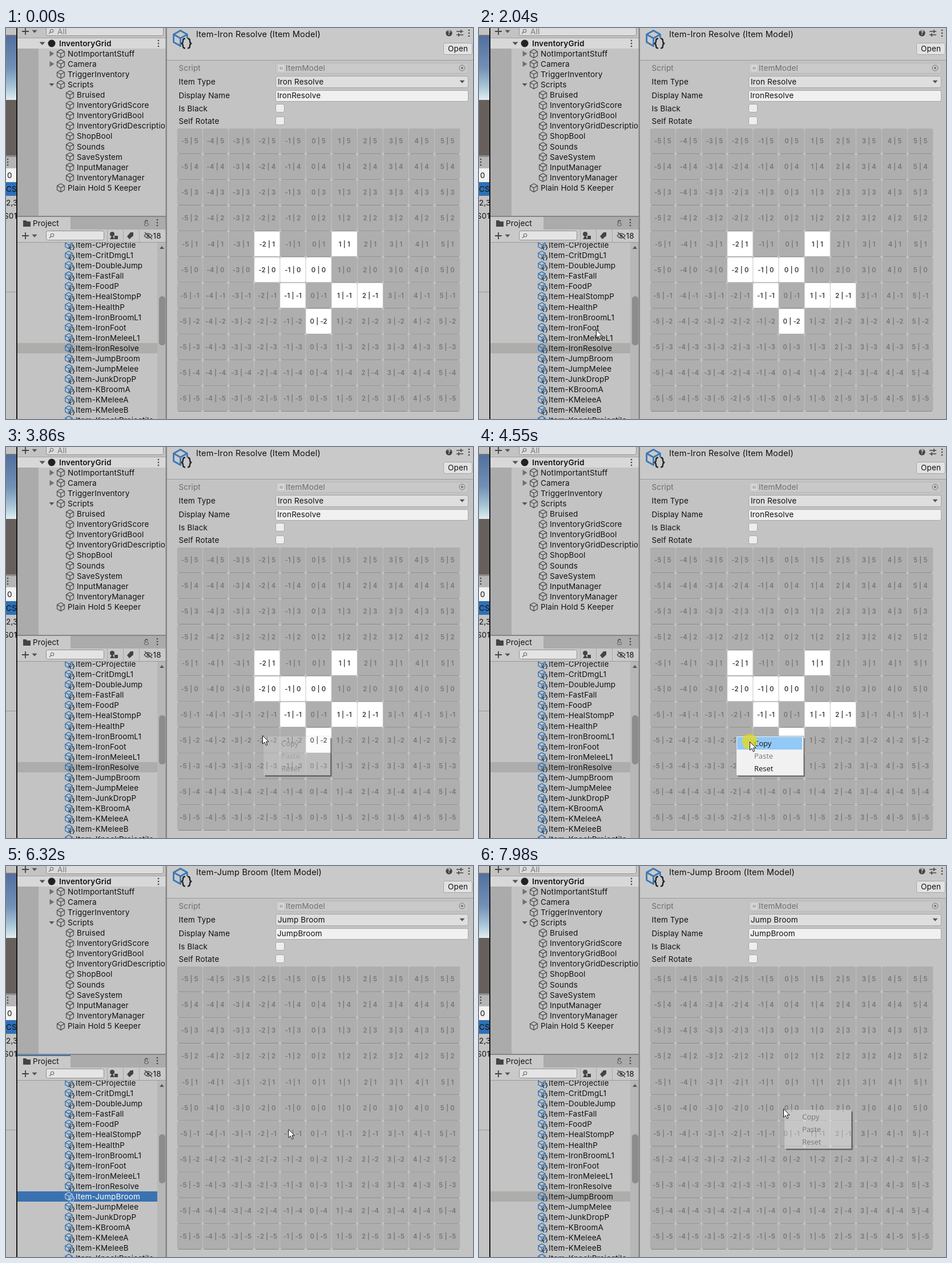
Animation, 818 px wide and 685 px high, one loop 8000 ms. Source, as an HTML page:

```html
<!DOCTYPE html>
<html lang="en">
<head>
<meta charset="utf-8">
<title>Inventory item editor</title>
<style>
html, body { margin: 0; width: 100%; height: 100%; overflow: hidden; background: #c3c3c3; }
svg { display: block; width: 100vw; height: 100vh; }
text { font: 13.5px Inter, sans-serif; letter-spacing: .15px; fill: #111; white-space: pre; }
.cell text { font-size: 11.25px; font-weight: 600; letter-spacing: .2px; text-anchor: middle; fill: #757575; }
.cell rect { fill: #aeaeae; }
.cell.on text { fill: #3c3c3c; }
.cell.on rect { fill: #fff; }
#menu text { font: 13px "Open Sans", sans-serif; letter-spacing: 0; }
.row .back { fill: none; }
.row.held .back { fill: #adadab; }
.row.focus .back { fill: #3a72b0; }
.row.focus text { fill: #fff; }
.row.focus path { stroke: #c6d8ea; stroke-width: 1.1; }
</style>
</head>
<body>
<svg id="stage" viewBox="0 0 818 685" preserveAspectRatio="none"></svg>
<script>
const rect = (x, y, w, h, fill, more = '') =>
  `<rect x="${x}" y="${y}" width="${w}" height="${h}" fill="${fill}" ${more}/>`;
const text = (x, mid, s, more = '') => `<text x="${x}" y="${Math.round(mid + 4.8)}" ${more}>${s}</text>`;
const line = (d, stroke = '#444', width = 1.3, more = '') =>
  `<path d="${d}" fill="none" stroke="${stroke}" stroke-width="${width}" ${more}/>`;
const shape = (d, fill = '#555') => `<path d="${d}" fill="${fill}"/>`;
const circle = (x, y, r, fill, more = '') => `<circle cx="${x}" cy="${y}" r="${r}" fill="${fill}" ${more}/>`;
const field = (x, y, w, h, fill, edge = '#a6a6a6') =>
  rect(x + .5, y + .5, w - 1, h - 1, fill, `rx="3" stroke="${edge}"`);

const right = (x, y) => shape(`M${x - 3.5} ${y - 5}l8 5l-8 5z`, '#707070');
const down = (x, y, r = 4.5) => shape(`M${x - r} ${y - r / 2}h${2 * r}l${-r} ${r * 1.1}z`, '#555');
const dots = (x, y) => [-5, 0, 5].map(d => circle(x, y + d, 1.3, '#444')).join('');
const plus = (x, y) => line(`M${x - 6} ${y}h12M${x} ${y - 6}v12`, '#444', 1.8);
const lens = (x, y) => circle(x + 1, y - 1, 2.7, 'none', 'stroke="#707070" stroke-width="1.1"') +
  line(`M${x - 1} ${y + 1}l-3 3`, '#707070');

function cube(x, y, r, color, width) {
  const a = r * .88, b = r / 2;
  return line(`M${x} ${y - r}l${a} ${b}v${r}l${-a} ${b}l${-a} ${-b}v${-r}z` +
    `m${-a} ${b}l${a} ${b}l${a} ${-b}m${-a} ${b}v${r}`, color, width, 'stroke-linejoin="round"');
}

function braces(x, y, s, width) {
  const half = k => `M${x + k * s * .25} ${y - s}q${k * s * .45} 0 ${k * s * .45} ${s * .4}` +
    `q0 ${s * .6} ${k * s * .4} ${s * .6}q${-k * s * .4} 0 ${-k * s * .4} ${s * .6}q0 ${s * .4} ${-k * s * .45} ${s * .4}`;
  return line(half(1) + half(-1), '#222', width);
}

function gameStrip() {
  return `<defs><linearGradient id="sky" x2="0" y2="1"><stop stop-color="#52709f"/>
    <stop offset=".5" stop-color="#7390b6"/><stop offset=".8" stop-color="#a9c6d8"/>
    <stop offset="1" stop-color="#e0eef0"/></linearGradient></defs>` +
    rect(0, 0, 18, 685, '#c3c3c3') + rect(0, 12, 18, 2, '#777') + rect(0, 14, 18, 112, 'url(#sky)') +
    rect(0, 126, 18, 97, '#665f5b') + rect(0, 223, 18, 3, '#8c8c8c') + rect(0, 226, 18, 19, '#b5b5b5') +
    dots(3, 235) + rect(0, 246, 18, 24, '#f2f2f2') + rect(0, 270, 18, 24, '#2f70b5') +
    text(2, 258, '0') + text(0, 282, 'CS') + text(0, 306, '2,3') + text(-4, 329, 'S01') +
    rect(0, 462, 18, 1, '#999') + rect(18, 0, 2, 685, '#161616');
}

function hierarchy() {
  const rows = [[1, 'NotImportantStuff', right], [1, 'Camera', right], [1, 'TriggerInventory'], [1, 'Scripts', down],
    ...['Bruised', 'InventoryGridScore', 'InventoryGridBool', 'InventoryGridDescriptio', 'ShopBool', 'Sounds',
      'SaveSystem', 'InputManager', 'InventoryManager'].map(s => [2, s]), [1, 'Plain Hold 5 Keeper']];
  return rect(20, 0, 260, 329, '#c3c3c3') + rect(20, 18, 37, 311, '#ababab') + rect(20, 18, 260, 18, '#d8d8d8') +
    rect(20, 17, 260, 1, '#a0a0a0') + plus(34, 6) + down(50, 6) + field(70, -8, 206, 22, '#dcdcdc', '#8e8e8e') +
    lens(79, 6) + text(90, 6, 'All', 'style="fill:#777"') +
    down(63.5, 27, 5) + circle(80, 27, 6.5, '#222') + text(93, 27, 'InventoryGrid', 'style="font-weight:600"') + dots(267, 27) +
    rows.map(([level, name, arrow], i) => {
      const y = 45 + i * 18.08, x = 80 + level * 16;
      return (arrow ? arrow(80, y) : '') + cube(x, y, 7.3, '#555', 1.4) + text(x + 12, y, name);
    }).join('');
}

const items = ['CProjectile', 'CritDmgL1', 'DoubleJump', 'FastFall', 'FoodP', 'HealStompP', 'HealthP', 'IronBroomL1',
  'IronFoot', 'IronMeleeL1', 'IronResolve', 'JumpBroom', 'JumpMelee', 'JunkDropP', 'KBroomA', 'KMeleeA', 'KMeleeB',
  'KnockProjectile'];

function project() {
  const list = items.map((name, i) => {
    const y = 380.3 + i * 18.07;
    return `<g class="row" id="row${i}"><rect class="back" x="20" y="${Math.round(y - 9)}" width="245" height="18"/>` +
      cube(110, y - .5, 7, '#3a78b5', 1.5) + braces(115.5, y + 4, 4.2, 1.2) + text(122, y, 'Item-' + name) + '</g>';
  }).join('');
  return rect(20, 376, 260, 309, '#c3c3c3') + list +
    rect(20, 329, 260, 2, '#858585') + rect(20, 331, 260, 22, '#ababab') + rect(20, 331, 93, 22, '#c9c9c9') +
    rect(20, 331, 93, 2, '#3a72b0', 'id="tab"') + shape('M30 337h5l2 2h6v9h-13z', '#444') + text(47, 342, 'Project') +
    field(242, 341, 8, 6, 'none', '#555') + line('M243.5 341v-2q2.5-4 5 0') + dots(265, 341) +
    rect(20, 353, 260, 22, '#c9c9c9') + rect(20, 375, 260, 1, '#999') + plus(34, 364) + down(50, 364) +
    field(70, 355, 102, 17, '#e4e4e4', '#8e8e8e') + lens(80, 364) +
    [177, 205, 233].map(x => rect(x, 353, 1, 22, '#aaa')).join('') +
    circle(186, 361, 4, '#444') + shape('M182 370l4-7l4 7z', '#444') + rect(190, 364, 6, 6, '#444') +
    shape('M212 365l6-7h5v6l-7 6z', '#444') +
    line('M242 364q7-8 14 0q-7 8-14 0M243 358l13 12', '#444', 1.4) + circle(249, 364, 2.3, '#444') + text(257.5, 364, '18') +
    rect(265, 376, 15, 309, '#b7b7b7') + shape('M269 387l4-5l4 5z') + rect(268, 470, 11, 86, '#8c8c8c', 'rx="5"');
}

const filled = new Set(['-2 | 1', '1 | 1', '-2 | 0', '-1 | 0', '0 | 0', '-1 | -1', '1 | -1', '2 | -1', '0 | -2']);

function grid() {
  let out = '';
  for (let row = 0; row < 11; row++) for (let col = 0; col < 11; col++) {
    const x = 299.8 + col * 45.13, y = 176 + row * 45.13, label = `${col - 5} | ${5 - row}`;
    out += `<g class="cell" data-label="${label}">` +
      `<path d="M${x + 2} ${y + 44}h40" stroke="#858585" stroke-width="1.4"/>` +
      `<rect x="${x}" y="${y}" width="44.2" height="43.8" rx="3"/>` +
      `<text x="${x + 22.2}" y="${Math.round(y + 26)}">${label}</text></g>`;
  }
  return out;
}

function inspector() {
  const grey = 'style="fill:#6e6e6e"';
  return rect(279.5, 0, 2.5, 685, '#858585') + rect(282, 0, 536, 685, '#c3c3c3') + rect(282, 0, 536, 56, '#c9c9c9') +
    rect(282, 56, 536, 1, '#999') + cube(305.5, 18, 13.5, '#3a78b5', 2.8) +
    rect(307, 18, 18, 18, '#c9c9c9', 'rx="5"') + braces(316, 27, 8.5, 2.4) +
    text(333, 11.5, '', 'id="title" style="font-size:14.6px"') +
    circle(776, 9, 5.6, '#444') + text(776, 8.6, '?', 'style="fill:#ddd;font-size:10px;font-weight:700;text-anchor:middle" dy="-1"') +
    line('M789 6h12M789 12h12M797 3v6M793 9v6', '#444', 1.6) + dots(811, 9) +
    field(766, 26, 51, 21, '#e2e2e2') + text(774, 36, 'Open') +
    ['Script', 'Item Type', 'Display Name', 'Is Black', 'Self Rotate']
      .map((s, i) => text(302.5, [70, 94, 118, 141, 163][i], s, i ? '' : grey)).join('') +
    field(472, 61, 338, 19, '#c9c9c9', '#b8b8b8') + rect(477, 65, 10, 11, '#dadada', 'rx="1"') +
    line('M480.5 67.5v6M483.5 67.5v6M479 69.3h6M479 71.7h6', '#999', .8) + text(490, 70, 'ItemModel', grey) +
    circle(799, 70, 5, 'none', 'stroke="#777"') + circle(799, 70, 2, '#777') +
    field(472, 84, 338, 21, '#dedede') + text(476, 94, '', 'id="type"') + down(799, 94) +
    field(472, 109, 338, 20, '#f0f0f0') + text(475, 118.5, '', 'id="name"') +
    field(472, 133, 16, 15, '#eee') + field(472, 155, 16, 15, '#eee') + grid();
}

const overlay = `<g id="menu">${line('M5 71.3H120.3V5', '#000', 2.6, 'opacity=".45"')}<g id="sheet">` +
  rect(1.5, 1.5, 118, 69, '#f1f1f1', 'stroke="#a5a5a5"') + rect(3, 3, 114, 22, '#91c9f7', 'id="hover"') +
  text(33, 14.5, 'Copy') + text(33, 36, 'Paste', 'id="paste"') + text(33, 57.7, 'Reset') + '</g></g>' +
  '<g id="cursor">' + circle(0, 0, 13.3, '#f2dc00', 'id="press" opacity=".68"') +
  '<path d="M.5 .5V15.2L4 12L6.3 17.6L8.8 16.6L6.5 11.2H11Z" fill="#fff" stroke="#111" stroke-linejoin="round"/></g>';

document.getElementById('stage').innerHTML = gameStrip() + hierarchy() + project() + inspector() + overlay;
const $ = id => document.getElementById(id);
const cells = [...document.querySelectorAll('.cell')];

// Pointer stops: time, x, y
const path = [[70, 520, 690], [250, 400, 540], [400, 378, 390], [560, 460, 255], [720, 610, 320], [840, 655, 478],
  [890, 655, 478], [1070, 493, 398], [1810, 493, 398], [2040, 205, 528], [2300, 190, 548], [2600, 181, 558],
  [2800, 181, 558], [2970, 434, 517], [3170, 435, 517], [3300, 449, 505], [4220, 449, 505], [4370, 474, 516],
  [4700, 474, 516], [5250, 166, 574], [5990, 166, 574], [6320, 494, 461], [6450, 529, 448], [6780, 529, 448],
  [6900, 400, 511], [7000, 324, 420], [7110, 400, 335], [7240, 570, 318], [7390, 779, 370], [7570, 533, 425], [8000, 533, 425]];

const slope = (i, k) => path[i] && path[i + 1] ? (path[i + 1][k] - path[i][k]) / (path[i + 1][0] - path[i][0]) : 0;
function tangent(i, k) {
  const a = slope(i - 1, k), b = slope(i, k);
  return a * b > 0 ? 2 * a * b / (a + b) : 0;
}
// Monotone cubic, so the pointer never overshoots a stop
function along(t, k) {
  const i = Math.max(0, path.findLastIndex(p => p[0] <= t));
  if (t <= path[0][0] || i === path.length - 1) return path[i][k];
  const [a, b] = [path[i], path[i + 1]], span = b[0] - a[0], u = (t - a[0]) / span, v = 1 - u;
  return v * v * (1 + 2 * u) * a[k] + u * u * (3 - 2 * u) * b[k] +
    span * u * v * (v * tangent(i, k) - u * tangent(i + 1, k));
}

const within = (t, a, b) => t >= a && t < b;
const ramp = (t, a, ms) => Math.min(1, Math.max(0, (t - a) / ms));
const show = (id, on) => $(id).setAttribute('visibility', on ? 'inherit' : 'hidden');
const place = (id, x, y) => $(id).setAttribute('transform', `translate(${x} ${y})`);

let shown;
function setItem(jump) {
  if (shown === jump) return;
  shown = jump;
  const [a, b] = jump ? ['Jump', 'Broom'] : ['Iron', 'Resolve'];
  $('title').textContent = `Item-${a} ${b} (Item Model)`;
  $('type').textContent = `${a} ${b}`;
  $('name').textContent = a + b;
  cells.forEach(c => c.classList.toggle('on', !jump && filled.has(c.dataset.label)));
}

function draw(t) {
  const focus = within(t, 2700, 3710) || within(t, 5630, 7620), second = t >= 5630;
  const state = focus ? 'row focus' : 'row held';
  $('row10').setAttribute('class', second ? 'row' : state);
  $('row11').setAttribute('class', second ? state : 'row');
  show('tab', focus);
  setItem(t >= 5680);

  const late = t > 7000;
  const alpha = late ? ramp(t, 7945, 100) : ramp(t, 3840, 100) * (1 - ramp(t, 4700, 100));
  show('menu', alpha > 0);
  $('sheet').setAttribute('opacity', alpha);
  place('menu', late ? 533 : 449, late ? 425 : 505);
  show('hover', within(t, 4260, 4800));
  $('paste').style.fill = late ? '#111' : '#777';

  place('cursor', along(t, 1), along(t, 2));
  show('cursor', t >= 70);
  show('press', within(t, 2700, 2800) || within(t, 4550, 4700) || within(t, 5630, 5780));
}

const start = performance.now();
function tick() {
  draw((performance.now() - start) % 8000);
  requestAnimationFrame(tick);
}
tick();
</script>
</body>
</html>
```
